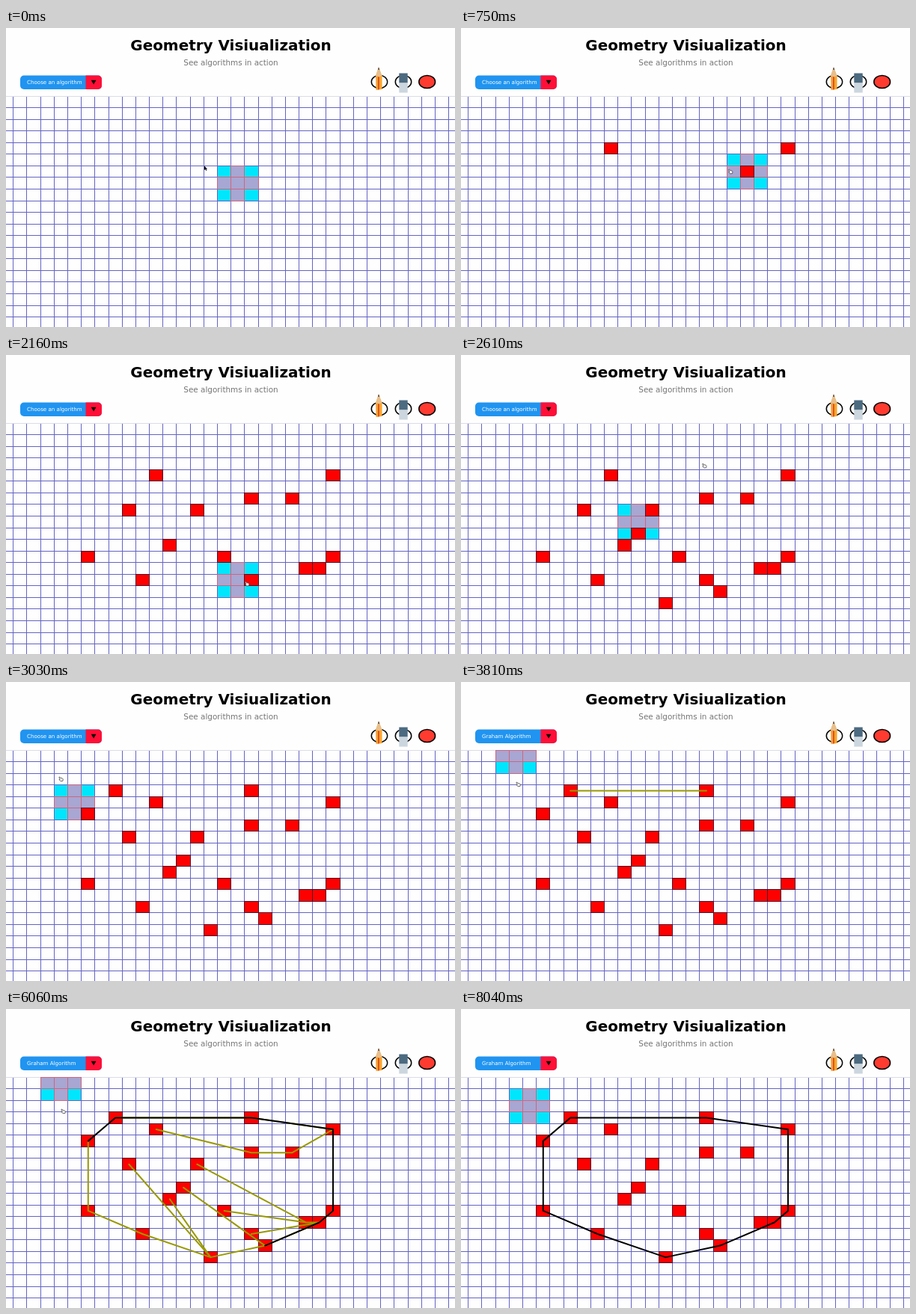
Recreate the animation shown at these times as an HTML page with a canvas. Size 600 by 400 pixels, loop 8.07 s.

```html
<!DOCTYPE html>
<html lang="en">
<head>
<meta charset="utf-8">
<title>Geometry Visiualization</title>
<style>
  html, body { margin: 0; width: 100%; height: 100%; overflow: hidden; background: #fefefe; }
  canvas, svg { position: absolute; left: 0; top: 0; width: 600px; height: 400px; }
  text { font-family: "DejaVu Sans", Verdana, sans-serif; }
</style>
</head>
<body>
<canvas id="board" width="600" height="400"></canvas>
<svg viewBox="0 0 600 400">
  <defs>
    <linearGradient id="wood">
      <stop offset=".3" stop-color="#f6a13a"/>
      <stop offset=".3" stop-color="#c9401c"/>
      <stop offset=".6" stop-color="#e8641c"/>
      <stop offset=".6" stop-color="#f9a52c"/>
    </linearGradient>
  </defs>
  <text x="300.5" y="30" font-size="19.95" font-weight="bold" text-anchor="middle">Geometry Visiualization</text>
  <text x="300.5" y="50" font-size="10.4" fill="#747474" text-anchor="middle">See algorithms in action</text>

  <rect x="19" y="63.5" width="109" height="18.5" rx="5" fill="#2094f0"/>
  <path d="M106.5 63.5H123a5 5 0 0 1 5 5V77a5 5 0 0 1-5 5H106.5Z" fill="#ff0f37"/>
  <path d="M113.7 69.8h6.8l-3.4 5.6Z"/>
  <text id="label" x="28" y="75" font-size="7.1" fill="#fff">Choose an algorithm</text>

  <g fill="none" stroke="#000" stroke-width="1.5">
    <ellipse cx="499" cy="72" rx="10.7" ry="8.7"/>
    <ellipse cx="531" cy="72" rx="10.7" ry="8.7"/>
    <ellipse cx="562.7" cy="72" rx="10.9" ry="8.6" fill="#ff3b30"/>
  </g>
  <path d="M494 64l4-11.5 4.5 11.5V82l-8 1Z" fill="url(#wood)"/>
  <path d="M494 64l4-11.5 4.5 11.5-4 1.5Z" fill="#e8bf8c"/>
  <path d="M496.9 55.8l1.1-3.3 1.3 3.3Z" fill="#444"/>
  <rect x="525.3" y="60.5" width="11.4" height="13" fill="#4c6a80"/>
  <rect x="525.3" y="73.5" width="11.4" height="13" fill="#ccd6de"/>
</svg>
<script>
const LOOP = 8070, STEP = 30;
const X0 = 9.8, Y0 = 91.1, DX = 18.18, DY = 15.55;
const PICK_AT = 3630, SCAN_AT = 3780, SCAN_STEP = 93;
const EXIT_AT = 3180, RETURN_AT = 7050, LEAD = 90;

const ctx = document.getElementById('board').getContext('2d');
const label = document.getElementById('label');

const path = [], placed = [];

function hover(t, c, r) {
  path.push({ t, p: [c, r] });
}

// Visits cells at an even pace and leaves a point in each
function place(from, to, cells) {
  cells.forEach((p, i) => {
    const stop = { t: from + (to - from) * (i + 1) / cells.length, p };
    path.push(stop);
    placed.push(stop);
  });
}

hover(-20, 16, 7);
place(-20, 1230, [[10, 4], [23, 4], [20, 6], [17, 6], [13, 7]]);
hover(1380, 13, 9);
hover(1530, 14, 10);
place(1530, 2130, [[11, 10], [8, 7], [5, 11], [9, 13], [15, 11],
  [21, 12], [22, 12], [23, 11], [17, 13]]);
hover(2160, 16, 13);
hover(2200, 16, 13);
place(2200, 2970, [[18, 14], [14, 15], [12, 9], [17, 3], [7, 3], [5, 5]]);
hover(3030, 4, 4);
hover(3120, 3, 2);
hover(EXIT_AT, 3, 0);
hover(RETURN_AT, 3, 0);
hover(7500, 4, 2);

function ease(u) {
  u = Math.min(1, Math.max(0, u));
  return u * u * (3 - 2 * u);
}

const mix = (a, b, u) => a + (b - a) * u;

function brushAt(t) {
  const i = path.findIndex(k => k.t > t);
  if (i < 0) return path.at(-1).p;
  const a = path[i - 1], b = path[i];
  const u = ease((t - a.t) / (b.t - a.t));
  return a.p.map((v, k) => mix(v, b.p[k], u));
}

const left = c => Math.floor(X0 + DX * c);
const upper = r => Math.floor(Y0 + DY * r);
const center = ([c, r]) => [X0 + DX * (c + .5), Y0 + DY * (r + .5)];

// Graham scan: every edge tried, and the final hull
function grahamScan(points) {
  const [pivot, ...rest] = [...points].sort((a, b) => a[1] - b[1] || a[0] - b[0]);
  const angle = p => Math.atan2(p[1] - pivot[1], p[0] - pivot[0]);
  const dist = p => Math.hypot(p[0] - pivot[0], p[1] - pivot[1]);
  const turn = (a, b, c) =>
    (b[0] - a[0]) * (c[1] - b[1]) - (b[1] - a[1]) * (c[0] - b[0]);
  rest.sort((a, b) => {
    const d = angle(a) - angle(b);
    return Math.abs(d) > 1e-9 ? d : dist(a) - dist(b);
  });
  const stack = [pivot], tried = [];
  for (const p of rest) {
    while (stack.length > 1 && turn(stack.at(-2), stack.at(-1), p) <= 0) stack.pop();
    tried.push([stack.at(-1), p]);
    stack.push(p);
  }
  return { tried, hull: stack.map((p, i) => [stack.at(i - 1), p]) };
}
const { tried, hull } = grahamScan(placed.map(k => k.p));

function fillCell(c, r, color) {
  ctx.fillStyle = color;
  ctx.fillRect(left(c), upper(r), left(c + 1) - left(c), upper(r + 1) - upper(r));
}

function frameCell(c, r, color) {
  ctx.strokeStyle = color;
  ctx.strokeRect(left(c) + .5, upper(r) + .5, left(c + 1) - left(c), upper(r + 1) - upper(r));
}

function drawGrid() {
  ctx.fillStyle = '#6464c4';
  for (let c = 0; c <= 32; c++) ctx.fillRect(left(c), 91, 1, 309);
  for (let r = 1; r <= 19; r++) ctx.fillRect(0, upper(r), 600, 1);
  ctx.fillStyle = '#dcdce8';
  ctx.fillRect(0, 91, 600, 1);
}

function eachBrushCell([c, r], draw) {
  for (let i = -1; i <= 1; i++)
    for (let j = -1; j <= 1; j++) draw(c + i, r + j, i && j);
}

function drawEdges(edges, color) {
  ctx.strokeStyle = color;
  ctx.lineWidth = 2;
  ctx.lineCap = 'round';
  ctx.beginPath();
  for (const [a, b] of edges) {
    ctx.moveTo(...center(a));
    ctx.lineTo(...center(b));
  }
  ctx.stroke();
}

const arrow = new Path2D('M0 -4L0 1.5 1.4 .5 2.4 2.5 3.3 2 2.4 .1 4 -.2Z');
const hand = new Path2D('M-2.6 -2.6L-1.6 -3 -.4 -1.4 1.8 -1.2 2.8 0 2.5 2.4 -.4 2.8 -2.4 .6 -1.2 .3Z');

// Leads the brush over the board, then goes to the menu and rests on an entry
function pointerAt(t) {
  if (t + LEAD < EXIT_AT) return center(brushAt(t + LEAD));
  const up = ease((t + LEAD - EXIT_AT) / 200), down = ease((t - 3480) / 120);
  return [mix(74, 76.5, up), mix(mix(99, 73, up), 137, down)];
}

function drawPointer(t) {
  if (t >= RETURN_AT) return;
  ctx.save();
  ctx.translate(...pointerAt(t));
  if (t < LEAD) {
    ctx.fillStyle = '#000';
    ctx.fill(arrow);
  } else {
    ctx.lineWidth = .8;
    ctx.fillStyle = '#fff';
    ctx.strokeStyle = '#444';
    ctx.fill(hand);
    ctx.stroke(hand);
  }
  ctx.restore();
}

function draw(t) {
  ctx.clearRect(0, 0, 600, 400);
  ctx.save();
  ctx.beginPath();
  ctx.rect(0, 91, 600, 309);
  ctx.clip();
  ctx.lineWidth = 1;

  const brush = brushAt(t).map(Math.round);
  eachBrushCell(brush, (c, r, corner) => fillCell(c, r, corner ? '#00e6fc' : '#a8a6d2'));
  drawGrid();
  eachBrushCell(brush, (c, r, corner) => corner || frameCell(c, r, '#cc6680'));

  for (const { t: at, p } of placed) {
    if (t < at) continue;
    fillCell(...p, '#f00');
    frameCell(...p, '#501028');
  }

  const n = Math.floor((t - SCAN_AT) / SCAN_STEP) + 1;
  if (n > 0) {
    if (n <= tried.length + hull.length) drawEdges(tried.slice(0, n), '#999900');
    drawEdges(hull.slice(0, Math.max(0, n - tried.length)), '#000');
  }
  ctx.restore();

  drawPointer(t);
  const text = t < PICK_AT ? 'Choose an algorithm' : 'Graham Algorithm';
  if (label.textContent !== text) label.textContent = text;
}

const start = performance.now();
function tick() {
  const t = (performance.now() - start) % LOOP;
  draw(Math.floor(t / STEP) * STEP);
  requestAnimationFrame(tick);
}
tick();
</script>
</body>
</html>
```
